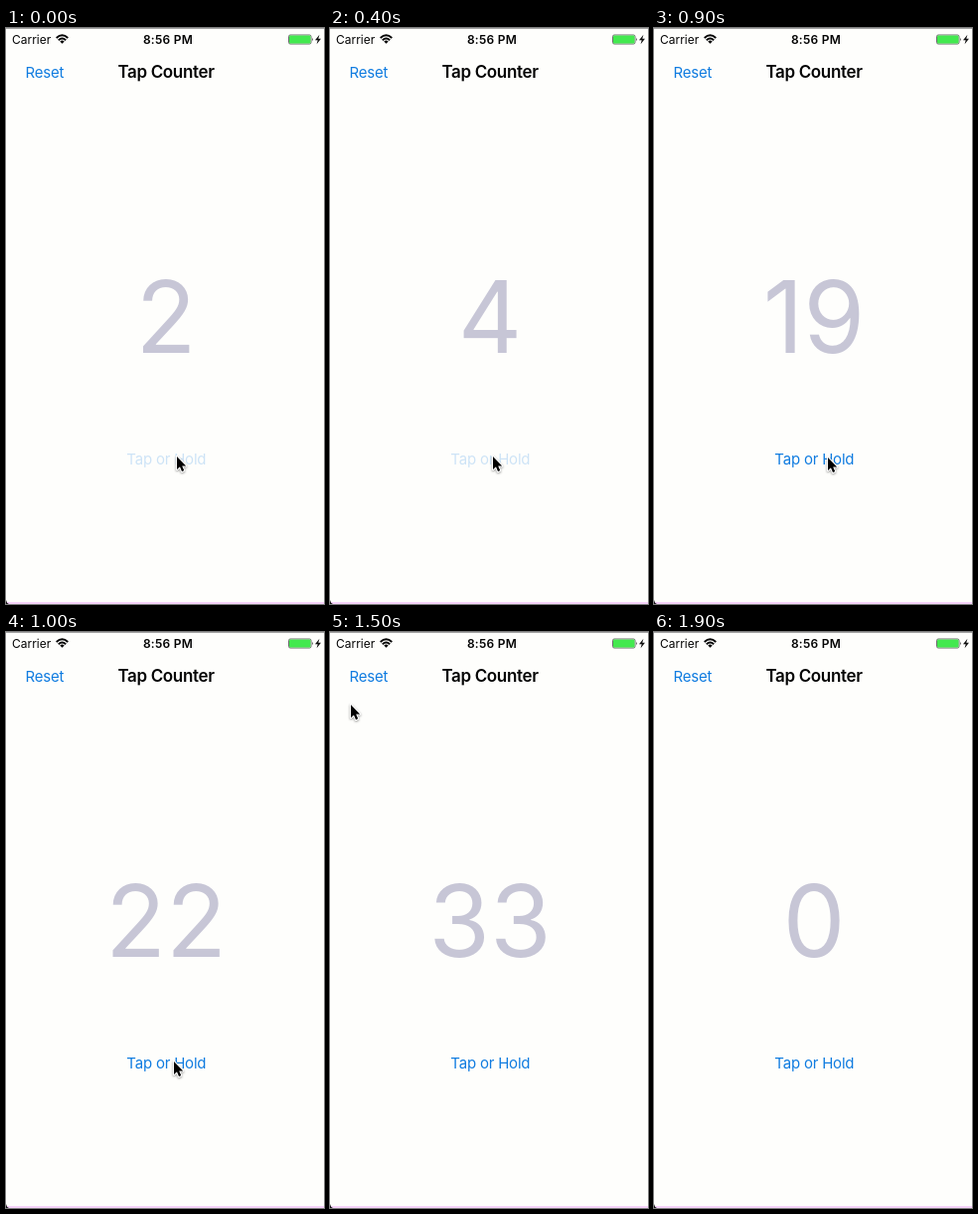
Write an HTML page that moves like this. It is 320x578 px and loops after 2100 ms.

```html
<!DOCTYPE html>
<html lang="en">
<head>
<meta charset="utf-8">
<title>Tap Counter</title>
<style>
  html, body { margin: 0; width: 100%; height: 100%; overflow: hidden; background: #fefefc; }
  svg { display: block; width: 100%; height: 100%; }
  text { font-family: Inter, Roboto, sans-serif; fill: #050505; }
  .status { font-size: 12px; }
  .clock { font-weight: 600; letter-spacing: .25px; }
  .title { font-size: 17px; font-weight: 600; letter-spacing: -.35px; }
  .action { font-size: 15px; letter-spacing: -.2px; fill: #107ce0; }
  .count { font-size: 100px; font-weight: 400; fill: #c7c6d6; }
  .centered { text-anchor: middle; }
  .pressed { opacity: .2; }
</style>
</head>
<body>
<svg viewBox="0 0 320 578">
  <rect width="320" height="578" fill="#fefefc"/>
  <path d="M0 .5H320" stroke="#a3a3a3"/>
  <path d="M0 577H320" stroke="#f6d3fa" stroke-width="2"/>
  <path d="M0 574Q.5 577 3 578H0Z" fill="#111"/>

  <text class="status" x="6" y="16">Carrier</text>
  <g fill="none" stroke="#050505" stroke-width="1.9">
    <path d="M50.7 10Q56.5 4.6 62.3 10M52.8 12.2Q56.5 8.8 60.2 12.2"/>
    <path d="M54.3 13.4Q56.5 11.6 58.7 13.4L56.5 15.8Z" fill="#050505" stroke="none"/>
  </g>
  <text class="status clock centered" x="163" y="16">8:56 PM</text>
  <rect x="284.5" y="7" width="22.5" height="9" rx="1.6" fill="#fefefc" stroke="#444" stroke-width=".8"/>
  <rect x="285" y="7.5" width="21.5" height="8" rx="1" fill="#43e94f"/>
  <path d="M308 9.8Q309.6 11.5 308 13.2Z" fill="#333"/>
  <path d="M315.4 6.8L311 12.2H313.7L312.6 16.2L317 10.7H314.3Z" fill="#111"/>

  <text class="action" x="19.5" y="49.5">Reset</text>
  <text class="title centered" x="161" y="50">Tap Counter</text>
  <text class="count centered" id="count" x="161" y="326">2</text>
  <text class="action centered" id="button" x="161.3" y="438">Tap or Hold</text>

  <g id="cursor" stroke-linejoin="round">
    <path id="arrow" d="M0 0V13L3 10.2L5 15L7.2 14.1L5.2 9.5H9.2Z" stroke="#fff" stroke-width="2.2" paint-order="stroke"
      style="filter: drop-shadow(0 1px 1px #0006)"/>
  </g>
</svg>
<script>
  const STEP = 100, LOOP = 2100, LAST = 19;
  const counts = [2, 2, 3, 3, 4, 6, 9, 12, 16, 19, 22, 26, 29, 32, 33, 33, 33, 0, 0, 0];
  // Cursor tip: [step, x, y]
  const path = [
    [0, 172, 430], [4, 164, 430], [6, 155, 430], [9, 175, 431],
    [12, 156, 430], [13, 152, 428], [15, 21, 73], [16, 36, 46], [18, 36, 46]
  ];
  const [count, button, cursor] = ["count", "button", "cursor"].map(id => document.getElementById(id));

  function cursorAt(step) {
    const next = Math.max(1, path.findIndex(point => point[0] >= step));
    const [s0, x0, y0] = path[next - 1], [s1, x1, y1] = path[next];
    const k = (step - s0) / (s1 - s0);
    return [x0 + (x1 - x0) * k, y0 + (y1 - y0) * k].map(Math.round);
  }

  function draw(time) {
    const step = Math.min(LAST, Math.floor(time % LOOP / STEP));
    count.textContent = counts[step];
    button.classList.toggle("pressed", step < 5);
    cursor.style.display = step < LAST ? "" : "none";
    if (step < LAST) cursor.setAttribute("transform", `translate(${cursorAt(step)})`);
  }

  const start = performance.now();
  function tick() {
    draw(performance.now() - start);
    requestAnimationFrame(tick);
  }
  tick();
</script>
</body>
</html>
```
